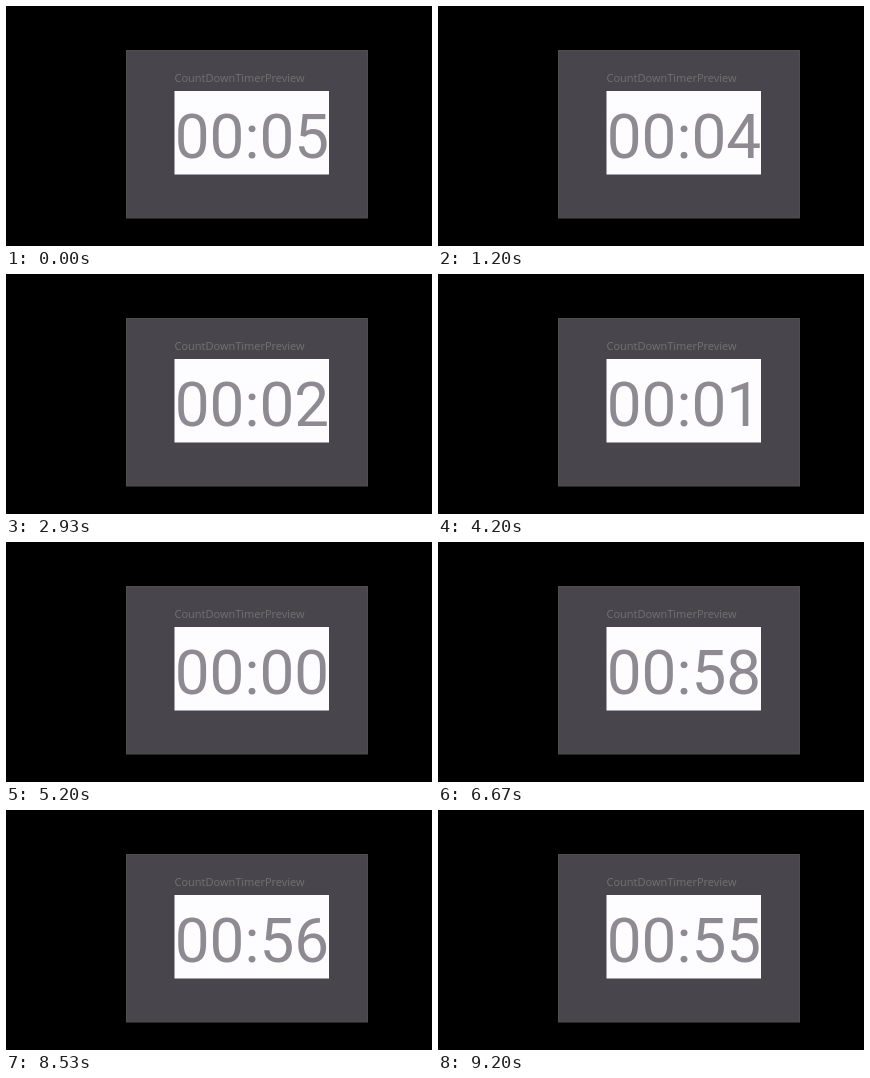
An HTML page that plays this animation: 426 px wide and 240 px high, repeating every 9270 ms.

```html
<!DOCTYPE html>
<html lang="en">
<head>
<meta charset="utf-8">
<title>Countdown</title>
<style>
  html, body { margin: 0; width: 100%; height: 100%; overflow: hidden; background: #000; }
  svg { display: block; width: 100vw; height: 100vh; }
  .label { font: 11px "Open Sans", "Noto Sans", sans-serif; fill: #737174; }
  .time { font: 62px Roboto, sans-serif; fill: #8e8a92; }
</style>
</head>
<body>
<svg viewBox="0 0 426 240">
  <rect x="120.5" y="44.5" width="241" height="167.5" fill="#48454c" stroke="#504e4a"/>
  <text class="label" x="168.5" y="76">CountDownTimerPreview</text>
  <rect x="168.5" y="85" width="154.5" height="83.5" fill="#fdfcfe"/>
  <text class="time" id="time" x="168.7" y="151.5">00:05</text>
</svg>
<script>
  const LOOP = 9270;
  // [start in ms, seconds shown]; the counter wraps from 00 to 59
  const ticks = [
    [0, 5], [730, 4], [1730, 3], [2730, 2], [3730, 1], [4730, 0],
    [5270, 59], [5730, 58], [6730, 57], [7730, 56], [8730, 55]
  ];
  const time = document.getElementById("time");

  function draw(now) {
    const t = now % LOOP;
    const [, seconds] = ticks.findLast(([start]) => start <= t);
    const text = "00:" + String(seconds).padStart(2, "0");
    if (time.textContent !== text) time.textContent = text;
    requestAnimationFrame(draw);
  }
  requestAnimationFrame(draw);
</script>
</body>
</html>
```
